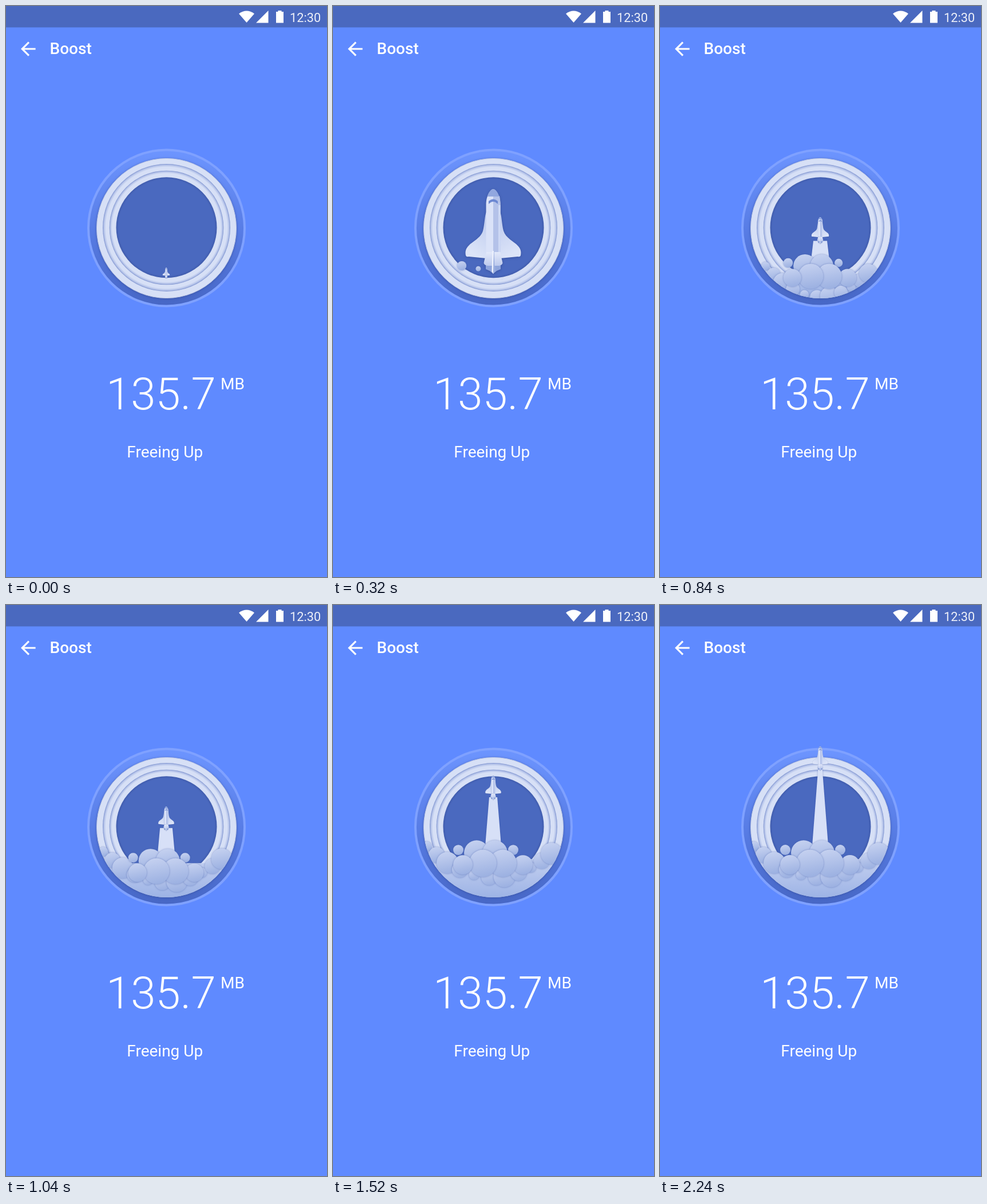
Animation, 561 px wide and 998 px high, one loop 3400 ms. Source, as an HTML page:

```html
<!DOCTYPE html>
<html lang="en">
<head>
<meta charset="utf-8">
<title>Boost</title>
<style>
  html, body { margin: 0; width: 100%; height: 100%; overflow: hidden; background: #5f8aff; }
  svg { display: block; width: 561px; height: 998px; }
  text { font-family: Roboto, sans-serif; font-size: 28px; fill: #fff; }
  #clouds circle { fill: url(#cloudFill); filter: drop-shadow(0 0 1.5px rgba(60, 85, 165, .5)); }
  #rocket { filter: drop-shadow(0 1px 2px rgba(35, 55, 125, .5)); }
  #beam { filter: drop-shadow(0 0 1.5px rgba(45, 70, 150, .4)); }
  .disc { filter: drop-shadow(0 1px 2px rgba(50, 75, 155, .7)); }
</style>
</head>
<body>
<svg viewBox="0 0 561 998">
  <defs>
    <linearGradient id="haloFill" x2="0" y2="1">
      <stop stop-color="#6d95ff"/><stop offset=".5" stop-color="#587de6"/><stop offset="1" stop-color="#4767c5"/>
    </linearGradient>
    <radialGradient id="ringFill">
      <stop offset=".95" stop-color="#d7e0f6"/><stop offset=".98" stop-color="#b5c3e9"/><stop offset="1" stop-color="#8095d0"/>
    </radialGradient>
    <radialGradient id="holeFill">
      <stop offset=".95" stop-color="#4a69bf"/><stop offset="1" stop-color="#405cad"/>
    </radialGradient>
    <linearGradient id="cloudFill" x1=".4" x2=".6" y2="1">
      <stop stop-color="#c5d1f0"/><stop offset="1" stop-color="#9bb0e1"/>
    </linearGradient>
    <linearGradient id="groundFill" gradientUnits="userSpaceOnUse" x1="0" x2="0" y1="440" y2="511">
      <stop stop-color="#c6d2f1"/><stop offset="1" stop-color="#9db3e5"/>
    </linearGradient>
    <linearGradient id="wingFill" x2=".3" y2="1">
      <stop stop-color="#bac8ed"/><stop offset="1" stop-color="#dce4f8"/>
    </linearGradient>
    <linearGradient id="engineFill" x2="0" y2="1">
      <stop stop-color="#e3e9fa"/><stop offset="1" stop-color="#bdcaed"/>
    </linearGradient>
    <clipPath id="discClip"><circle cx="280.5" cy="388.5" r="122.5"/></clipPath>
    <path id="halfWing" d="M12 40C15 46 15 62 18 73C22 86 36 91 43 99C49 105 49 111 48 116Q47 119 43 118L12 121Z"/>
  </defs>

  <rect width="561" height="998" fill="#5f8aff"/>
  <rect width="561" height="37.4" fill="#4a69bf"/>
  <g fill="#fff">
    <path d="M420.5 29 407 13.5Q420.5 3.5 434 13.5Z"/>
    <path d="M437 29.5H458.5V8Z"/>
    <path d="M472 10H475.5V8H481.5V10H485V29.5H472Z"/>
    <path transform="translate(19.6 55.8) scale(1.6)" d="M20 11H7.8l5.6-5.6L12 4l-8 8 8 8 1.4-1.4L7.8 13H20z"/>
  </g>
  <text x="496" y="28" style="font-size:21.8px" fill-opacity=".9">12:30</text>
  <text x="76.5" y="84" font-weight="500">Boost</text>
  <text x="175" y="704.5" font-weight="300" style="font-size:78px">135.7</text>
  <text x="375" y="670">MB</text>
  <text x="211.3" y="789">Freeing Up</text>

  <circle cx="280.5" cy="388" r="136.5" fill="url(#haloFill)" stroke="#7fa1ff" stroke-width="4"/>
  <circle class="disc" cx="280.5" cy="388.5" r="122" fill="#d7e0f6" stroke="#c0cae6"/>
  <circle cx="280.5" cy="387.5" r="111.5" fill="url(#ringFill)"/>
  <circle cx="280.5" cy="387.5" r="99.8" fill="url(#ringFill)"/>
  <circle cx="280.5" cy="387.2" r="88" fill="url(#holeFill)"/>

  <path id="beam" fill="#d7e0f7"/>
  <g id="rocket">
    <g id="wings" fill="url(#wingFill)">
      <use href="#halfWing"/>
      <use href="#halfWing" transform="scale(-1 1)"/>
    </g>
    <path d="M-13 131H13V140L6 143 0 148-6 143-13 140Z" fill="#8fa5dc"/>
    <path d="M-12.5 110V25C-12 12-5 0 0 0S12 12 12.5 25V110Z" fill="#dae2f8"/>
    <path d="M0 12H11Q12.5 18 12.5 25V110H0Z" fill="#b4c2e9"/>
    <path d="M9 28H12.5V110H9Z" fill="#cdd8f4"/>
    <path d="M-10.5 13C-8 5-3 0 0 0S8 5 10.5 13Z" fill="#91a7df"/>
    <path d="M-8 26V21Q0 14 8 21V26L4 23Q0 21-4 23Z" fill="#6c88d2"/>
    <path d="M-12 110H12L16.5 129Q16 133 10 134H-10Q-16 133-16.5 129Z" fill="url(#engineFill)"/>
    <path d="M-1.5 108H1.5L2.5 144 0 148-2.5 144Z" fill="#eef2fd"/>
    <path d="M1 108H1.5L2.5 144 0 148Z" fill="#8fa5dc"/>
  </g>
  <g clip-path="url(#discClip)">
    <rect id="ground" x="150" width="262" height="130" fill="url(#groundFill)"/>
    <g id="clouds"></g>
  </g>
</svg>

<script>
const LOOP = 3400, STEP = 40, LAST = 2240, CENTER = 280;
const $ = id => document.getElementById(id);
const mix = (a, b, u) => a + (b - a) * u;
const progress = (t, from, to) => Math.min(1, Math.max(0, (t - from) / (to - from)));

function ramp(t, from, to) {
  const u = progress(t, from, to);
  return u * u * (3 - 2 * u);
}

function set(node, attributes) {
  for (const name in attributes) node.setAttribute(name, attributes[name]);
}

// How each bank of smoke drifts from where it swells to where it rests.
const bankDrift = { spread: 0.75, drop: 46, size: 0.8, from: 640, to: 1200 };
const plumeDrift = { spread: 0.9, drop: 26, size: 0.9, from: 560, to: 1560 };
const clouds = [];

function addCloud(x, y, r, start, drift) {
  const node = document.createElementNS("http://www.w3.org/2000/svg", "circle");
  $("clouds").append(node);
  clouds.push({ x, y, r, start, drift, node });
}

// A sagging bank of puffs from edge to edge of the disc.
for (let i = 0; i <= 10; i++) {
  const u = i / 5 - 1;
  const x = 273 + 109 * u + 8 * Math.sin(Math.PI * u);
  const y = 476 - 50 * ((x - CENTER) / 112) ** 2;
  addCloud(x, y, 14 - 5 * Math.cos(Math.PI * i / 2), 380, bankDrift);
}

// Two rows of four puffs, fullest in the middle, pile up under the rocket.
const swell = k => Math.sin(Math.PI * k / 3);
for (let k = 0; k < 4; k++) addCloud(219 + 32 * k, 428 + 6 * swell(k), 9 + 15 * swell(k), 40 + 200 * k, plumeDrift);
for (let k = 3; k >= 0; k--) addCloud(227 + 35 * k, 454 - 3 * swell(k), 17 + 8 * swell(k), 300, plumeDrift);

function drawRocket(t) {
  const emerge = ramp(t, 0, 320);
  const recede = 1 - (1 - progress(t, 320, 970)) ** 2;
  const scale = 0.13 + 0.87 * emerge - 0.715 * recede;
  const top = 457 - 137 * emerge + 60 * ramp(t, 320, 620) - 133 * ramp(t, 540, LAST);
  set($("rocket"), { transform: `translate(${CENTER} ${top}) scale(${scale})` });
  set($("wings"), { transform: `translate(0 ${-14 * (1 - scale)})` });

  // The beam narrows towards the rocket as it climbs.
  const half = 3.5 + 0.07 * (top - 247), beamTop = top + 132 * scale;
  set($("beam"), {
    d: `M${CENTER - half} ${beamTop}H${CENTER + half}L${CENTER + 15.5} 440H${CENTER - 15.5}Z`,
    opacity: t < 600 ? 0 : 1
  });
}

function drawSmoke(t) {
  const bankRise = ramp(t, bankDrift.from, bankDrift.to);
  set($("ground"), {
    y: 444 + 36 * (1 - bankRise) + 40 * (1 - ramp(t, 380, 540)),
    opacity: ramp(t, 380, 660)
  });
  for (const { x, y, r, start, drift, node } of clouds) {
    const move = ramp(t, drift.from, drift.to);
    set(node, {
      cx: CENTER + (x - CENTER) * mix(drift.spread, 1, move),
      cy: y + drift.drop * (1 - move),
      r: r * ramp(t, start, start + 260) * mix(drift.size, 1, move)
    });
  }
}

const began = performance.now();
function tick() {
  const elapsed = (performance.now() - began) % LOOP;
  const t = Math.min(LAST, Math.floor(elapsed / STEP) * STEP);
  drawRocket(t);
  drawSmoke(t);
  requestAnimationFrame(tick);
}
tick();
</script>
</body>
</html>
```
